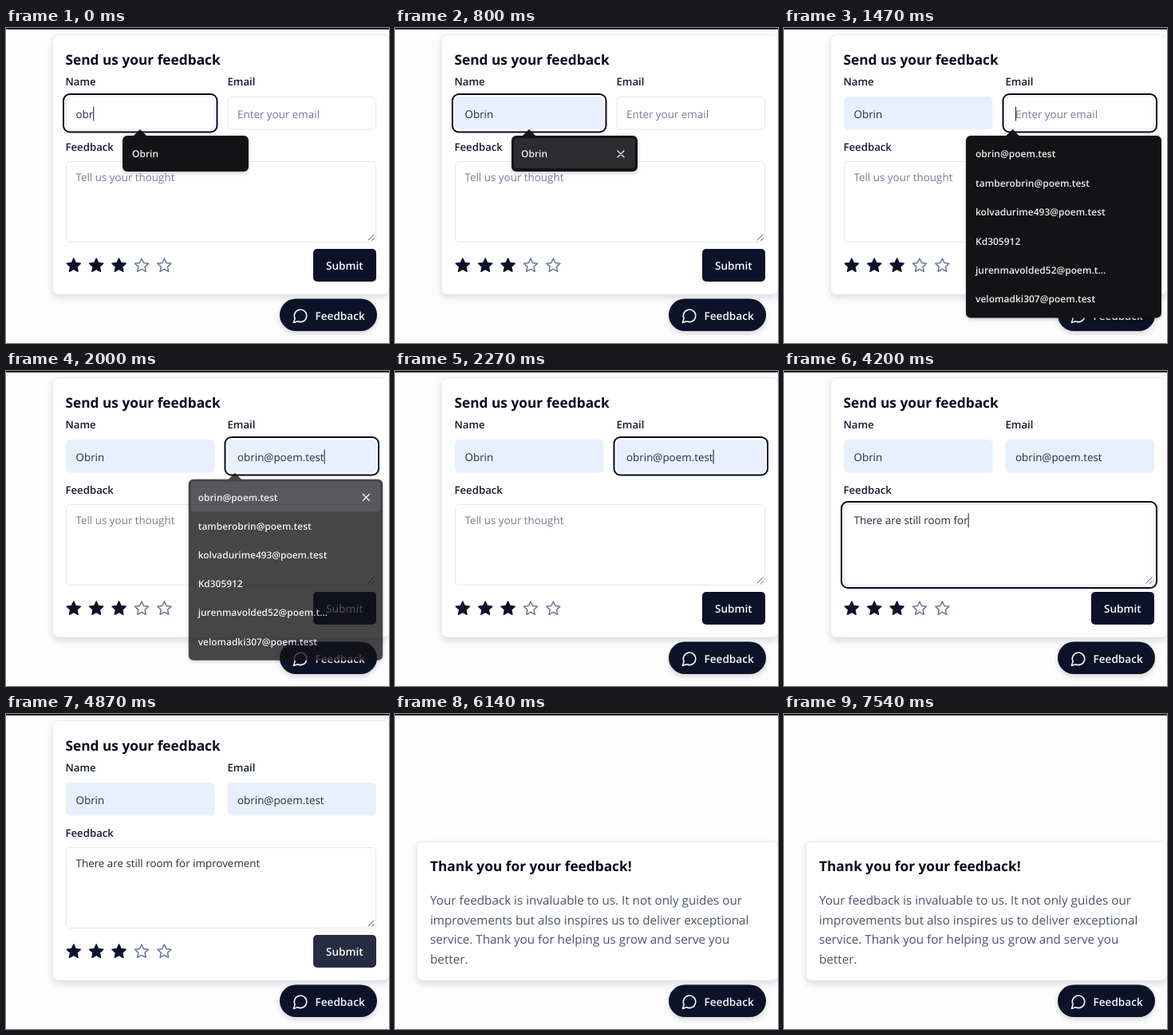
Write an HTML page that moves like this. It is 480x395 px and loops after 8880 ms.

```html
<!DOCTYPE html>
<html lang="en">
<head>
<meta charset="utf-8">
<title>Feedback form</title>
<style>
  html, body { margin: 0; width: 100%; height: 100%; overflow: hidden; background: #fdfdfe; }
  svg { display: block; width: 100vw; height: 100vh; }
  text { font: 400 13.4px "Open Sans", "Noto Sans", sans-serif; fill: #262c40; text-rendering: geometricPrecision; white-space: pre; }
  .title { font-size: 17.3px; font-weight: 700; fill: #06091c; }
  .label { font-size: 13.2px; font-weight: 600; fill: #141a30; }
  .hint { fill: #757d93; }
  .body { font-size: 15.24px; fill: #4b566b; }
  .button { font-size: 13.6px; font-weight: 600; fill: #f8fafc; }
  .item { font-size: 12px; font-weight: 600; fill: #ececee; }
  .card { fill: #fefefe; stroke: #e8eaf1; filter: drop-shadow(0 4px 4px rgb(0 0 20 / .13)); }
  .field { fill: #fefefe; stroke: #e4e8f0; }
  .filled { fill: #e8f0fe; stroke: #e8f0fe; }
  .ring { fill: none; stroke: #050a1c; stroke-width: 2; }
  .caret { stroke: #141a2c; stroke-width: 1; }
  .line { fill: none; stroke-linecap: round; stroke-linejoin: round; }
  .popup { filter: drop-shadow(0 2px 2px rgb(0 0 20 / .2)); transform-box: fill-box; transform-origin: center; }
  .panel { fill: #131315; }
</style>
</head>
<body>
<svg id="stage" viewBox="0 0 480 395" preserveAspectRatio="none"></svg>
<script>
const LOOP = 8880;
const NAME = "Obrin";
const EMAIL = "obrin@poem.test";
const MESSAGE = "There are still room for improvement";
const SUGGESTIONS = [
  EMAIL, "tamberobrin@poem.test", "kolvadurime493@poem.test",
  "Kd305912", "jurenmavolded52@poem.t...", "velomadki307@poem.test"
];
const PRIMARY = "#0c1228";
const stage = document.getElementById("stage");

function add(parent, tag, attrs = {}, content = "") {
  const el = document.createElementNS("http://www.w3.org/2000/svg", tag);
  for (const key in attrs) el.setAttribute(key, attrs[key]);
  el.textContent = content;
  return parent.appendChild(el);
}
const group = (parent, cls = "") => add(parent, "g", { class: cls });
const label = (parent, x, y, cls, content) => add(parent, "text", { x, y, class: cls }, content);
const rect = (parent, cls, x, y, width, height, rx, fill) =>
  add(parent, "rect", { class: cls, x, y, width, height, rx, ...(fill && { fill }) });
const show = (el, on) => { el.style.display = on ? "" : "none"; };
const between = (t, from, to) => t >= from && t < to;

// Value of the last [time, value] entry reached.
function at(steps, t) {
  let value = steps[0][1];
  for (const [time, next] of steps) if (t >= time) value = next;
  return value;
}

function makeField(parent, x, y, w, h, baseline, hint) {
  const box = rect(parent, "field", x + .5, y + .5, w - 1, h - 1, 5);
  const ring = rect(parent, "ring", x - 3, y - 3, w + 6, h + 6, 8);
  const placeholder = label(parent, x + 12.5, baseline, "hint", hint);
  const value = label(parent, x + 12.5, baseline, "", "");
  const caret = add(parent, "line", { class: "caret", y1: baseline - 14, y2: baseline + 4 });
  return ({ text, filled, focus, blink }) => {
    if (value.textContent !== text) value.textContent = text;
    box.setAttribute("class", filled ? "filled" : "field");
    show(placeholder, !text);
    show(ring, focus);
    show(caret, focus && blink);
    const caretX = x + 13 + (text ? value.getComputedTextLength() : 0);
    caret.setAttribute("x1", caretX);
    caret.setAttribute("x2", caretX);
  };
}

function makePopup(x, w, h, arrowX, items) {
  const root = group(stage, "popup");
  add(root, "path", { class: "panel", d: `M${arrowX - 9} 136l9-9 9 9z` });
  rect(root, "panel", x, 135, w, h, 6);
  const hover = group(root);
  rect(hover, "", x + 3, 138, w - 6, 38, 4, "#2c2c30");
  add(hover, "path", { class: "line", stroke: "#ececee", "stroke-width": 1.4, d: `M${x + w - 25} 154l8 8m0-8l-8 8` });
  items.forEach((item, i) => label(root, x + 12, 162.3 + i * 36.4, "item", item));
  return (opacity, hovered) => {
    show(root, opacity > 0);
    root.setAttribute("opacity", opacity);
    root.style.transform = `scale(${.97 + .03 * opacity})`;
    show(hover, hovered);
  };
}

function star(parent, cx, cy, solid) {
  const points = Array.from({ length: 10 }, (_, i) => {
    const r = i % 2 ? 4.3 : 9;
    const a = i * Math.PI / 5 - Math.PI / 2;
    return `${(cx + r * Math.cos(a)).toFixed(2)},${(cy + r * Math.sin(a)).toFixed(2)}`;
  });
  add(parent, "polygon", {
    class: "line", points: points.join(" "), "stroke-width": 1.5,
    stroke: solid ? PRIMARY : "#6b7790",
    style: `fill:${solid ? PRIMARY : "none"}`
  });
}

rect(stage, "", 0, 0, 480, 395, 0, "#fdfdfe");
rect(stage, "", 0, 0, 480, 1.7, 0, "#000");

const form = group(stage);
rect(form, "card", 58.5, 8.5, 421.5, 325.5, 7);
label(form, 74.5, 46, "title", "Send us your feedback");
label(form, 74.5, 72, "label", "Name");
label(form, 277.5, 72, "label", "Email");
label(form, 74.5, 153.5, "label", "Feedback");
const nameField = makeField(form, 75, 86, 186.5, 41.5, 112.5, "");
const emailField = makeField(form, 277.5, 86, 186.5, 41.5, 112.5, "Enter your email");
const messageField = makeField(form, 75, 167, 389, 102, 192.3, "Tell us your thought");
add(form, "path", { class: "line", stroke: "#5a5d68", d: "M454 266l7-7M458.500 266.500l3-3" });
for (let i = 0; i < 5; i++) star(form, 84.8 + i * 28.4, 298, i < 3);
const submit = rect(form, "", 385, 277, 79, 41, 5, PRIMARY);
label(form, 401, 303.3, "button", "Submit");

const thanks = group(stage);
rect(thanks, "card", 27.5, 160, 452.5, 174, 7);
label(thanks, 44, 197, "title", "Thank you for your feedback!");
[
  "Your feedback is invaluable to us. It not only guides our",
  "improvements but also inspires us to deliver exceptional",
  "service. Thank you for helping us grow and serve you",
  "better."
].forEach((line, i) => label(thanks, 44, 239.3 + i * 24.4, "body", line));

const pill = group(stage);
rect(pill, "", 343, 339.5, 122, 40.5, 20.25, PRIMARY).style.filter = "drop-shadow(0 3px 3px rgb(0 0 20 / .16))";
add(pill, "path", {
  class: "line", stroke: "#f8fafc", "stroke-width": 1.8,
  transform: "translate(358.700 350.500) scale(.86)", d: "M7.9 20A9 9 0 1 0 4 16.100L2 22Z"
});
label(pill, 387.5, 365.6, "button", "Feedback");

const namePopup = makePopup(146, 158, 45, 168, [NAME]);
const emailPopup = makePopup(228, 245, 228.5, 286.5, SUGGESTIONS);

const nameFade = [[0, 1], [1000, .6], [1140, 0]];
const emailFade = [[0, 0], [1400, .6], [1470, 1], [2000, .78], [2070, .4], [2140, 0]];
const firstKeys = [[0, 0], [2670, 1], [3000, 2], [3200, 3], [3400, 4]];

function typedCount(t) {
  if (t < 3470) return at(firstKeys, t);
  const tick = Math.floor((t - 3400) / 67) * 67;
  return Math.min(MESSAGE.length, 4 + Math.round(tick * 32 / 1206));
}

function render(t) {
  const done = t >= 6070;
  show(form, !done);
  show(thanks, done);
  namePopup(at(nameFade, t), t >= 540);
  emailPopup(at(emailFade, t), t >= 1740);
  if (done) return;
  nameField({
    text: t < 540 ? NAME.slice(0, 3).toLowerCase() : NAME,
    filled: t >= 540,
    focus: t < 1400,
    blink: t < 540 || t >= 1140
  });
  emailField({
    text: t < 1740 ? "" : EMAIL,
    filled: t >= 1740,
    focus: between(t, 1400, 2400),
    blink: t < 1740 || t >= 1940
  });
  messageField({
    text: MESSAGE.slice(0, typedCount(t)),
    filled: false,
    focus: between(t, 2400, 4740),
    blink: true
  });
  submit.setAttribute("fill", at([[0, PRIMARY], [4800, "#1b2136"], [4870, "#272d41"]], t));
}

const start = performance.now();
function tick() {
  render((performance.now() - start) % LOOP);
  requestAnimationFrame(tick);
}
tick();
</script>
</body>
</html>
```
